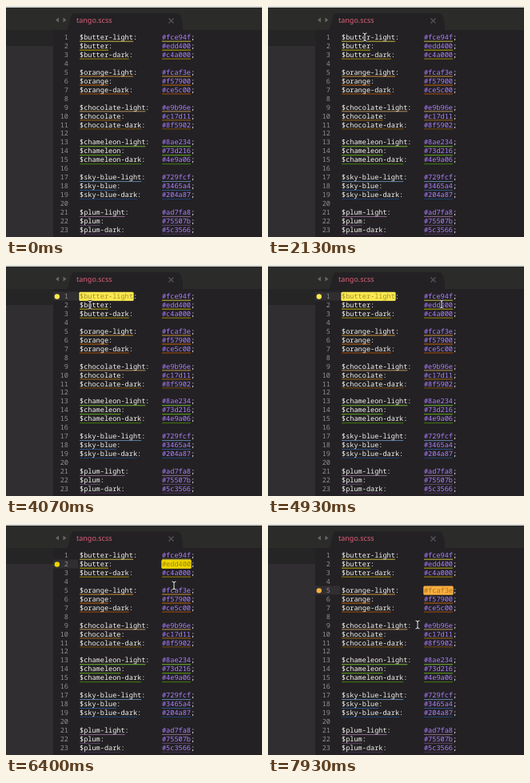
An HTML page for the animation above (8 s loop, 320 px wide and 289 px high).

```html
<!DOCTYPE html>
<html lang="en">
<head>
<meta charset="utf-8">
<title>Colour highlighter</title>
<style>
html, body { margin: 0; width: 100%; height: 100%; overflow: hidden; background: #232124; }
svg { display: block; width: 320px; height: 289px; }
text { font: 500 8.58px "Noto Sans Mono", "DejaVu Sans Mono", monospace; text-rendering: geometricPrecision; }
.name { fill: #f8f8f2; }
.value { fill: #ae81ff; }
.ink { fill: #4a3a10; fill-opacity: .5; }
.num { fill: #8f908a; font-weight: 400; text-anchor: end; }
.title { font: 9px "Noto Sans", "Open Sans", sans-serif; fill: #e0607a; }
</style>
</head>
<body>
<svg id="stage" viewBox="0 0 320 289">
  <rect width="320" height="289" fill="#232124"/>
  <rect width="59" height="289" fill="#302e30"/>
  <rect width="320" height="30" fill="#2b2b29"/>
  <rect y="30" width="59" height="20" fill="#252525"/>
  <path d="M75 31C80 29 79 10 85 9H214Q221 10 221 31Z" fill="#232124"/>
  <rect width="320" height="2" fill="#d6d8d4"/>
  <path d="M66 14.5V20.5L62 17.5ZM71.500 14.500V20.500L75.500 17.500Z" fill="#666"/>
  <text class="title" x="88" y="21">tango.scss</text>
  <path d="M203.500 15.500l6 6m0-6l-6 6" stroke="#555" stroke-width="1.200"/>
</svg>
<script>
const LOOP = 8000, FPS = 15;
const LEFT = 92, CHAR = 5.148, VALUE_X = LEFT + 20 * CHAR;
const rowY = line => 39 + (line - 1) * 10.96;

const palette = [
  ["butter", "fce94f", "edd400", "c4a000"],
  ["orange", "fcaf3e", "f57900", "ce5c00"],
  ["chocolate", "e9b96e", "c17d11", "8f5902"],
  ["chameleon", "8ae234", "73d216", "4e9a06"],
  ["sky-blue", "729fcf", "3465a4", "204a87"],
  ["plum", "ad7fa8", "75507b", "5c3566"]
];

const rows = palette.flatMap(([base, ...shades], group) =>
  ["-light", "", "-dark"].map((suffix, i) => ({
    line: group * 4 + i + 1,
    name: "$" + base + suffix,
    value: "#" + shades[i]
  })));

// Clicks that select a token
const picks = [
  { at: 2470, line: 1, part: "name" },
  { at: 5140, line: 2, part: "value" },
  { at: 6670, line: 5, part: "value" }
];
const FILL_DELAY = 130;

// Pointer moves; bow bends the path sideways at its middle
const origin = [269, 139];
const moves = [
  { at: 930, time: 600, to: [121, 49] },
  { at: 1530, time: 200, to: [121, 39] },
  { at: 3000, time: 70, to: [124, 40] },
  { at: 3270, time: 800, to: [105, 50], bow: [30, 12] },
  { at: 4130, time: 800, to: [217, 49], bow: [-90, 120] },
  { at: 5000, time: 330, to: [228, 50] },
  { at: 5800, time: 530, to: [210, 77] },
  { at: 6400, time: 330, to: [224, 83], bow: [-10, 58] },
  { at: 7600, time: 330, to: [187, 126] }
];

const stage = document.getElementById("stage");

function add(tag, attrs, parent = stage) {
  const el = document.createElementNS("http://www.w3.org/2000/svg", tag);
  for (const key in attrs) el.setAttribute(key, attrs[key]);
  parent.appendChild(el);
  return el;
}

function write(string, x, line, style, parent) {
  add("text", { x, y: rowY(line) + 2.9, class: style }, parent).textContent = string;
}

function underline(x, length, line, fill) {
  add("rect", { x, y: rowY(line) + 4.7, width: length * CHAR, height: 1, fill, opacity: .75 });
}

const band = add("rect", { x: 59, y: -5.5, width: 31, height: 11, fill: "#302e31" });

for (let line = 1; line <= 23; line++) write(line, 78, line, "num");

for (const { line, name, value } of rows) {
  underline(LEFT, name.length, line, value);
  underline(VALUE_X, value.length, line, value);
  write(name + ":", LEFT, line, "name");
  write(value, VALUE_X, line, "value");
  write(";", VALUE_X + 7 * CHAR, line, "name");
}

for (const pick of picks) {
  const row = rows.find(r => r.line === pick.line);
  const x = pick.part === "name" ? LEFT : VALUE_X;
  const y = rowY(pick.line), string = row[pick.part];
  pick.mark = add("g", { fill: row.value });
  add("circle", { cx: 63.8, cy: y + .5, r: 3.2 }, pick.mark);
  add("rect", { x: x - .7, y: y - 5.3, width: string.length * CHAR + 1.4, height: 11, rx: 1.5 }, pick.mark);
  write(string, x, pick.line, "ink", pick.mark);
}

const pointer = add("g", { fill: "none" });
const beam = "M-2.500 -5Q0 -5 0 -3.500Q0 -5 2.500 -5M0 -4V4M-2.500 5Q0 5 0 3.500Q0 5 2.500 5";
add("path", { d: beam, stroke: "#19191b", "stroke-width": 2.6 }, pointer);
add("path", { d: beam, stroke: "#f4f4f4", "stroke-width": 1 }, pointer);

const ease = k => k * k * (3 - 2 * k);

function pointerAt(t) {
  let from = origin;
  for (const { at, time, to, bow = [0, 0] } of moves) {
    if (t < at) break;
    const k = ease(Math.min(1, (t - at) / time));
    if (k < 1) return from.map((p, i) => p + (to[i] - p) * k + bow[i] * Math.sin(Math.PI * k));
    from = to;
  }
  return from;
}

const show = (el, on) => el.setAttribute("visibility", on ? "visible" : "hidden");
const place = (el, x, y) => el.setAttribute("transform", `translate(${x} ${y})`);

function render(t) {
  // Motion advances on a 15 fps grid, with times rounded to 10 ms
  const step = Math.floor((t + 4) * FPS / 1000);
  const time = Math.round(step * 100 / FPS) * 10;
  const active = picks.filter(p => p.at <= time).pop();
  show(band, active);
  if (active) place(band, 0, rowY(active.line));
  for (const pick of picks) show(pick.mark, pick === active && time >= pick.at + FILL_DELAY);
  show(pointer, time >= moves[0].at);
  place(pointer, ...pointerAt(time));
}

const start = performance.now();
function tick() {
  render((performance.now() - start) % LOOP);
  requestAnimationFrame(tick);
}
tick();
</script>
</body>
</html>
```
